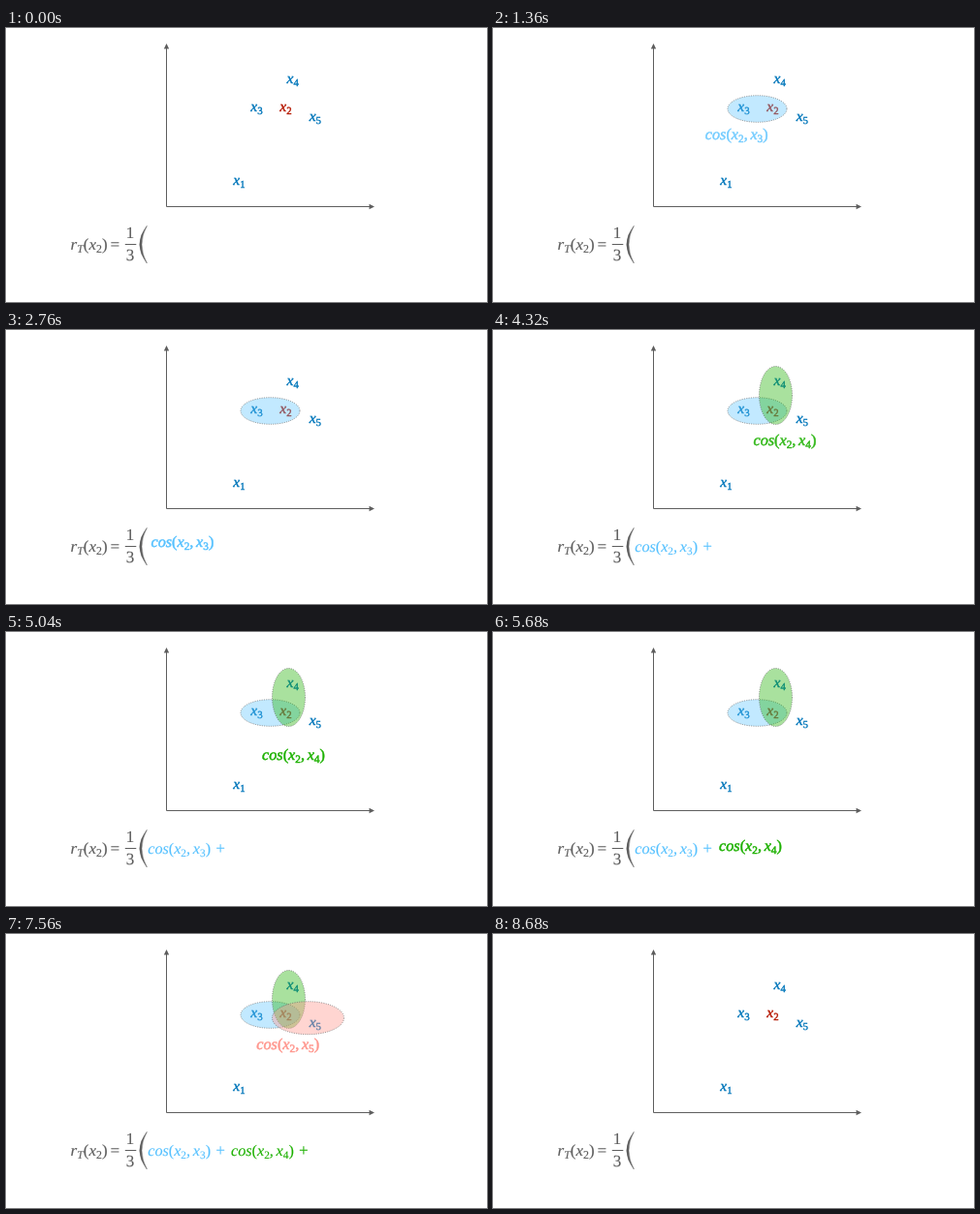
An HTML page for the animation above (8720 ms loop, 496 by 283 pixels).

```html
<!DOCTYPE html>
<html lang="en">
<head>
<meta charset="utf-8">
<title>Mean cosine similarity</title>
<style>
  html, body { margin: 0; width: 100%; height: 100%; overflow: hidden; background: #fff; }
  svg { display: block; width: 100%; height: 100%; }
  text { font: italic 17px "Liberation Serif", "Noto Serif", serif; text-rendering: geometricPrecision; stroke: currentColor; stroke-width: .15; }
  .up { font-style: normal; }
  .sub { font-size: .7em; }
  .term { font-size: 16.2px; }
  .label { font-size: 15.5px; stroke-width: .4; }
  .bold { stroke-width: .5; }
</style>
</head>
<body>
<svg id="stage" viewBox="0 0 496 283">
  <g fill="#5e5e5e" stroke="none">
    <path d="M165.5 20V184.5H375" fill="none" stroke="#5e5e5e"/>
    <path d="M165.5 16l2.7 5.5h-5.4zM380 184.5l-5.5 2.7v-5.4z"/>
    <path d="M122.8 223.5h11.5" stroke="#5e5e5e"/>
    <path d="M145.3 204.3Q130.3 223.5 145.3 243Q134.7 223.5 145.3 204.3z" stroke="#5e5e5e" stroke-width=".5"/>
  </g>
</svg>
<script>
const LOOP = 8720, REST = 120, END = 8680, STAGE = END / 9;
const GREY = '#5e5e5e', BLUE = '#0076ba', RED = '#b51700';
const stage = document.getElementById('stage');

function add(tag, attrs, markup = '') {
  const node = document.createElementNS('http://www.w3.org/2000/svg', tag);
  for (const key in attrs) node.setAttribute(key, attrs[key]);
  node.innerHTML = markup;
  stage.append(node);
  return node;
}

// Markup: _c is a subscript; parentheses and digits are upright; a comma adds a thin space.
function math(source) {
  let previous = '';
  return source.match(/_.|./g).map(token => {
    const sub = token[0] === '_';
    const char = sub ? token[1] : token;
    const dy = sub ? 3.2 : previous[0] === '_' ? -3.2 : 0;
    const dx = previous === ',' ? 2.7 : 0;
    previous = token;
    const names = (sub ? 'sub ' : '') + (/[()\d]/.test(char) ? 'up' : '');
    return `<tspan dx="${dx}" dy="${dy}" class="${names}">${char}</tspan>`;
  }).join('');
}

const write = (source, x, y, color, style = '') => add('text',
  { x, y, fill: color, color, class: style }, math(source));

write('r_T(x_2)', 66.5, 229, GREY);
write('=', 106.5, 229, GREY);
write('1', 123.8, 216.5, GREY);
write('3', 123.8, 240, GREY);

write('x_1', 234.3, 162, BLUE, 'label');
write('x_2', 282.3, 86, RED, 'label');
write('x_3', 252.3, 86, BLUE, 'label');
write('x_4', 289.6, 57, BLUE, 'label');
write('x_5', 312.7, 96, BLUE, 'label');

const terms = [
  { label: 'cos(x_2,x_3)', color: '#56c1ff', alpha: .36, oval: [272.5, 83.5, 30.5, 13.8], from: [218.8, 115], to: [146.2, 229] },
  { label: 'cos(x_2,x_4)', color: '#1db100', alpha: .38, oval: [291.5, 67.5, 17, 30], from: [268.5, 118.5], to: [232, 229] },
  { label: 'cos(x_2,x_5)', color: '#ff968d', alpha: .4, oval: [311.5, 86.7, 37, 17], from: [258.3, 118.5], to: [318, 229] }
];

for (const term of terms) {
  const [cx, cy, rx, ry] = term.oval;
  term.ellipse = add('ellipse', {
    cx, cy, rx, ry, fill: term.color, 'fill-opacity': term.alpha,
    stroke: GREY, 'stroke-width': .7, 'stroke-dasharray': '1 1.3'
  });
}
for (const term of terms) {
  term.text = write(term.label, 0, 0, term.color, 'term');
  term.plus = write('+', term.to[0] + 69, 229, term.color);
}

const clamp = u => Math.max(0, Math.min(1, u));
const fade = u => Math.sin(clamp(u) * Math.PI / 2);
const glide = u => (1 - Math.cos(clamp(u) * Math.PI)) / 2;

// Each term takes three stages: oval appears, label appears, label moves into the sum.
function draw(time) {
  const progress = time < REST || time >= END ? 0 : time / STAGE;
  terms.forEach((term, i) => {
    const u = progress - 3 * i;
    const move = glide(u - 2);
    const [x, y] = term.from.map((start, k) => start + (term.to[k] - start) * move);
    term.ellipse.setAttribute('opacity', fade(u));
    term.text.setAttribute('opacity', fade(1.5 * (u - 1)));
    term.text.setAttribute('transform', `translate(${x} ${y})`);
    term.text.classList.toggle('bold', u < 3);
    term.plus.setAttribute('opacity', i < 2 ? fade(u - 3) : 0);
  });
}

function tick() {
  draw(performance.now() % LOOP);
  requestAnimationFrame(tick);
}
tick();
</script>
</body>
</html>
```
